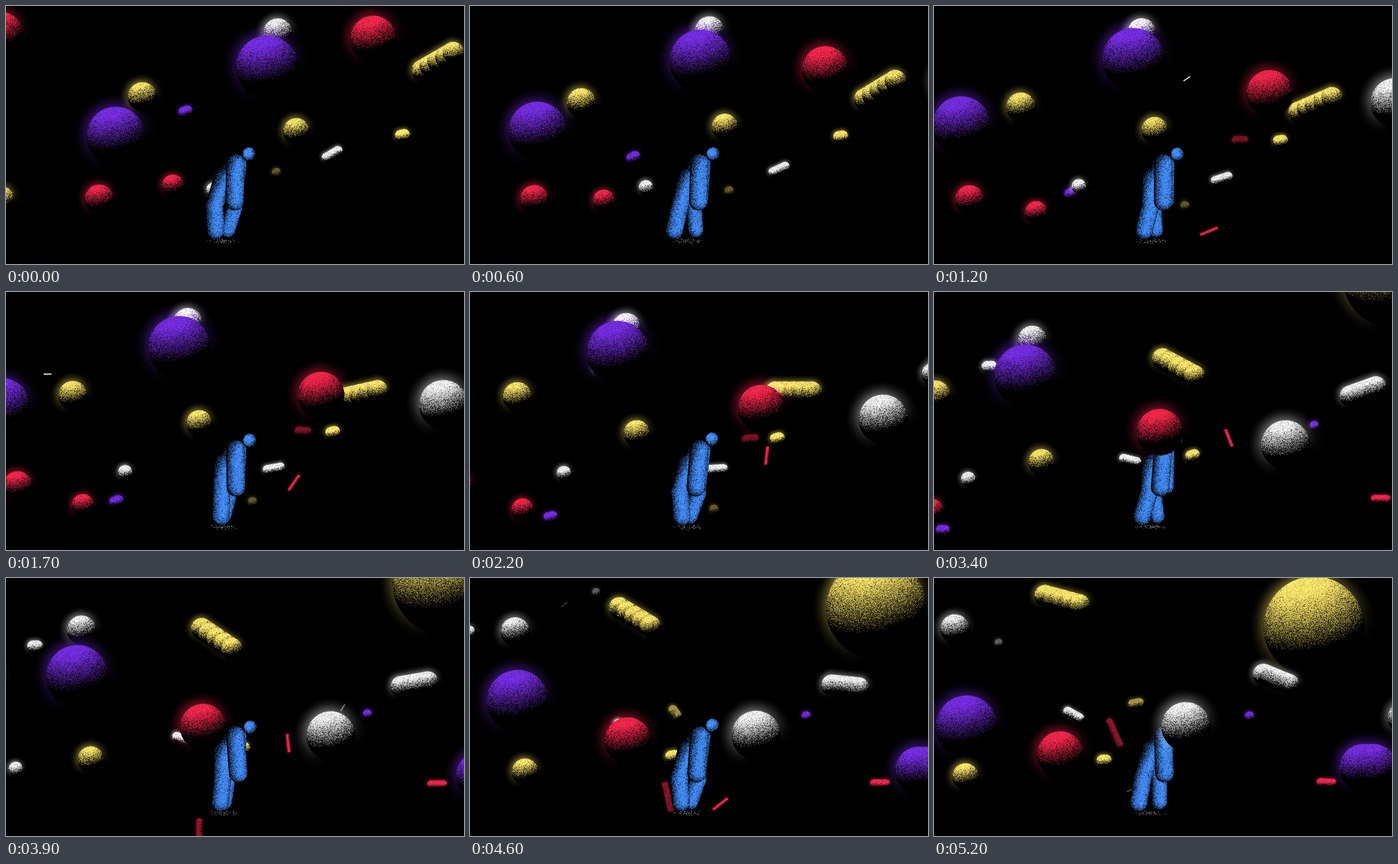
Write an HTML page with a canvas that moves like this. It is 690 px wide and 388 px high and loops after 5300 ms.

```html
<!DOCTYPE html>
<html lang="en">
<head>
<meta charset="utf-8">
<title>Walker among drifting orbs</title>
<style>
html, body { margin: 0; width: 100%; height: 100%; overflow: hidden; background: #000; }
canvas { display: block; width: 100vw; height: 100vh; }
</style>
</head>
<body>
<canvas id="stage" width="690" height="388"></canvas>
<script>
const W = 690, H = 388, STEP = 100, COUNT = 53, END = 5.2;
const ctx = document.getElementById('stage').getContext('2d');
const img = ctx.createImageData(W, H);
const px = img.data;

const RED = [232, 36, 72], YELLOW = [240, 218, 100], PURPLE = [110, 42, 212];
const WHITE = [228, 228, 228], BLUE = [66, 138, 246];

const { sin, cos, PI } = Math;
const clamp = v => v < 0 ? 0 : v > 1 ? 1 : v;

// seeded grain
const MASK = 131071;
let seed = 20471;
const rand = () => (seed = (Math.imul(seed, 1664525) + 1013904223) >>> 0) / 4294967296;
const grain = Float32Array.from({ length: MASK + 1 }, rand);
let shift = 0;
const noise = (x, y, k) => grain[(y * 701 + x + shift + k * 37813) & MASK];

// light from the upper left; small solids are lit all round
const orbLight = (nx, ny, nz, r) =>
  clamp((-0.2 * nx - 0.85 * ny + 0.36 * nz) * 1.1 + 0.06 + 0.5 * clamp((18 - r) / 14));

// the walker's back fades into the dark
const bodyLight = (nx, ny, nz, r, x, y) =>
  clamp(nx * 0.28 - ny * 0.1 + nz * 0.95 - 0.04) * clamp((y - 250 + (x - 324) * 1.5) / 50 + 0.5);

const headLight = (nx, ny, nz) => clamp(nz * 0.9 - nx * 0.25 - ny * 0.25 + 0.1);

// a round stroke through pts, shaded like a solid
function blob(pts, r, tint, { glow = 0, dim = 1, light = orbLight } = {}) {
  const reach = Math.min(22, 3 + r * 0.5);
  const pad = r + (glow ? reach : 1);
  const xs = pts.map(p => p[0]), ys = pts.map(p => p[1]);
  const x0 = Math.max(0, Math.floor(Math.min(...xs) - pad));
  const x1 = Math.min(W - 1, Math.ceil(Math.max(...xs) + pad));
  const y0 = Math.max(0, Math.floor(Math.min(...ys) - pad));
  const y1 = Math.min(H - 1, Math.ceil(Math.max(...ys) + pad));
  const segs = Math.max(1, pts.length - 1);
  for (let y = y0; y <= y1; y++) for (let x = x0; x <= x1; x++) {
    let d = 1e9, dx = 0, dy = 0;
    for (let s = 0; s < segs; s++) {
      const a = pts[s], b = pts[s + 1] || a;
      const vx = b[0] - a[0], vy = b[1] - a[1], l = vx * vx + vy * vy;
      const u = l ? clamp(((x - a[0]) * vx + (y - a[1]) * vy) / l) : 0;
      const ex = x - a[0] - u * vx, ey = y - a[1] - u * vy, e = Math.hypot(ex, ey);
      if (e < d) { d = e; dx = ex; dy = ey; }
    }
    if (d > pad) continue;
    const o = (y * W + x) * 4;
    const cover = clamp(r - d + 0.5);
    if (glow && cover < 1) {
      const side = clamp(0.42 - dy / d * 0.5 - dx / d * 0.3);
      const g = glow * dim * side * (1 - cover) * clamp(1 - (d - r) / reach) ** 1.7;
      for (let c = 0; c < 3; c++) px[o + c] += tint[c] * g;
    }
    if (cover > 0) {
      const nx = dx / r, ny = dy / r, nz = Math.sqrt(Math.max(0, 1 - nx * nx - ny * ny));
      const p = light(nx, ny, nz, r, x, y);
      const lit = noise(x, y, 0) < p ** 0.8 ? 0.55 + 0.45 * p : 0;
      const v = (0.5 * p + 0.5 * lit) * (0.85 + 0.35 * noise(x, y, 1));
      for (let c = 0; c < 3; c++) px[o + c] += (tint[c] * v - px[o + c]) * cover * dim;
    }
  }
}

// smooth curve through evenly timed points [x, y, angle]
function along(pts, u) {
  const s = u * (pts.length - 1), out = [0, 0, 0];
  pts.forEach((p, i) => {
    let w = 1;
    pts.forEach((_, j) => { if (j !== i) w *= (s - j) / (i - j); });
    for (let c = 0; c < 3; c++) out[c] += w * (p[c] || 0);
  });
  return out;
}

function rod([x, y, deg], len) {
  const a = deg * PI / 180, cx = cos(a) * len / 2, cy = sin(a) * len / 2;
  return len ? [[x - cx, y - cy], [x + cx, y + cy]] : [[x, y]];
}

const back = [], front = [];

// a solid that follows a curve from t0 to t1
function drift(layer, tint, r, len, t0, t1, pts, { dim = 1, beads = 0 } = {}) {
  layer.push(t => {
    if (t < t0 - 0.15 || t > t1 + 0.15) return;
    const ends = rod(along(pts, (t - t0) / (t1 - t0)), len);
    blob(ends, r, tint, { glow: 0.42, dim });
    for (let i = 0; i < beads; i++)
      blob([along(ends, i / (beads - 1))], r, tint);
  });
}

// tiny tumbling specks
for (let i = 0; i < 9; i++) {
  const born = rand() * END, x = 90 + rand() * 500, y = 40 + rand() * 340, spin = 200 * rand();
  back.push(t => {
    const age = t - born;
    if (age > 0 && age < 0.7)
      blob(rod([x - 75 * age, y, spin * age - 60], 10), 1.3, WHITE, { dim: sin(age / 0.7 * PI) });
  });
}

drift(back, YELLOW, 7, 0, 0, 2.9, [[407, 250], [374, 308], [367, 336]], { dim: 0.4 });
drift(back, RED, 7, 12, 1.2, 2.9, [[461, 202], [431, 217], [369, 244, -40]], { dim: 0.5 });
drift(back, RED, 2.5, 24, 1.2, 4.6, [[414, 339, -22], [449, 238, -90], [442, 222, -110], [377, 340, -38]]);
drift(back, RED, 5, 38, 3.9, END, [[291, 385, 90], [299, 336, 78], [272, 233, 66]], { dim: 0.6 });
drift(back, YELLOW, 7, 10, 4.5, END, [[309, 204, 64], [304, 188, -10]], { dim: 0.65 });
drift(back, WHITE, 6, 0, 4.5, END, [[205, 8], [97, 97]], { dim: 0.4 });
drift(back, WHITE, 9, 6, 2.2, 4.6, [[196, 115], [83, 112], [-5, 80]]);
drift(back, PURPLE, 8, 6, 0, 3.9, [[270, 158, -20], [199, 288, -25], [84, 350, -5], [-25, 352]]);
drift(back, WHITE, 11, 0, 0, 4.4, [[312, 276], [141, 272], [-22, 294]]);
drift(back, WHITE, 7, 20, 0, END, [[491, 222, -30], [401, 265, -10], [291, 251, 15], [210, 205, 30]]);
drift(back, YELLOW, 9, 5, 0, END, [[597, 194, -10], [490, 211, -12], [385, 247, -18], [256, 274]]);
drift(back, PURPLE, 7, 0, 2.9, END, [[602, 195], [536, 205], [475, 207]]);
drift(back, RED, 6, 18, 2.4, END, [[722, 312, 5], [654, 310], [591, 307, 3]]);

drift(front, WHITE, 22, 0, 0, END, [[409, 40], [271, 46], [143, 73], [31, 76]]);
drift(front, PURPLE, 47, 0, 0, END, [[393, 91], [258, 83], [133, 128], [49, 223]]);
drift(front, PURPLE, 44, 0, 0, 2.6, [[165, 195], [31, 178], [-90, 160]]);
drift(front, YELLOW, 22, 0, 0, 4.4, [[205, 136], [71, 157], [-52, 145]]);
drift(front, YELLOW, 20, 0, 0, END, [[437, 188], [288, 198], [157, 258], [47, 298]]);
drift(front, RED, 22, 0, 0, 2.6, [[140, 290], [46, 291], [-48, 290]]);
drift(front, RED, 17, 0, 0, 3.9, [[251, 270], [97, 324], [-35, 322]]);
drift(front, RED, 34, 0, 0, 1, [[-9, 42], [-85, 48]]);
drift(front, YELLOW, 20, 0, 0, 1, [[-7, 291], [-85, 298]]);
drift(front, YELLOW, 16, 54, 0, END, [[650, 83, -30], [530, 154, -12], [361, 110, 29], [193, 33, 15]], { beads: 5 });
drift(front, RED, 35, 0, 0, END, [[553, 49], [472, 156], [334, 212], [190, 265]]);
drift(front, YELLOW, 76, 0, 3, END, [[717, -50], [645, 19], [572, 73]]);
drift(front, WHITE, 16, 41, 1.7, END, [[735, 90, -55], [676, 133, -30], [606, 161, -7], [515, 152, 22]]);
drift(front, WHITE, 37, 0, 0.6, END, [[735, 115], [627, 188], [508, 234], [379, 223]]);
drift(front, PURPLE, 36, 15, 3.4, END, [[750, 304], [699, 292], [654, 285]]);
drift(front, WHITE, 24, 0, 4.5, END, [[755, 205], [707, 210]]);

function walker(t) {
  const a = 2 * PI * t / 2.35, sway = sin(2 * a);
  const limb = (r, ...pts) => blob(pts, r, BLUE, { light: bodyLight });

  for (let y = 349; y < 358; y++) for (let x = 300; x < 355; x++) {
    const d = Math.hypot((x - 327) / 27, (y - 353) / 4.5);
    if (noise(x, y, 3) < 0.45 * (1 - d)) px.fill(100, (y * W + x) * 4, (y * W + x) * 4 + 3);
  }
  limb(11, [351, 238], [347 - 3 * cos(a), 292]);
  limb(12, [332, 275], [337 + 7 * cos(a), 302], [333 + 6 * sin(a), 336]);
  limb(13, [340, 240], [327, 268]);
  limb(13.5, [326, 258], [319 - 7 * cos(a - 0.6), 301], [315 - 8 * sin(a), 337]);
  limb(14, [345, 236], [344 + 6 * sway, 293]);
  blob([[366 + 2 * sway, 222 + 2 * sway]], 10, BLUE, { light: headLight });
}

function draw(n) {
  const t = n * STEP / 1000;
  shift = n * 7919;
  new Uint32Array(px.buffer).fill(0xff000000);
  back.forEach(f => f(t));
  walker(t);
  front.forEach(f => f(t));
  ctx.putImageData(img, 0, 0);
}

const start = performance.now();
let shown = -1;
function tick() {
  const n = Math.floor((performance.now() - start) / STEP) % COUNT;
  if (n !== shown) draw(shown = n);
  requestAnimationFrame(tick);
}
tick();
</script>
</body>
</html>
```
